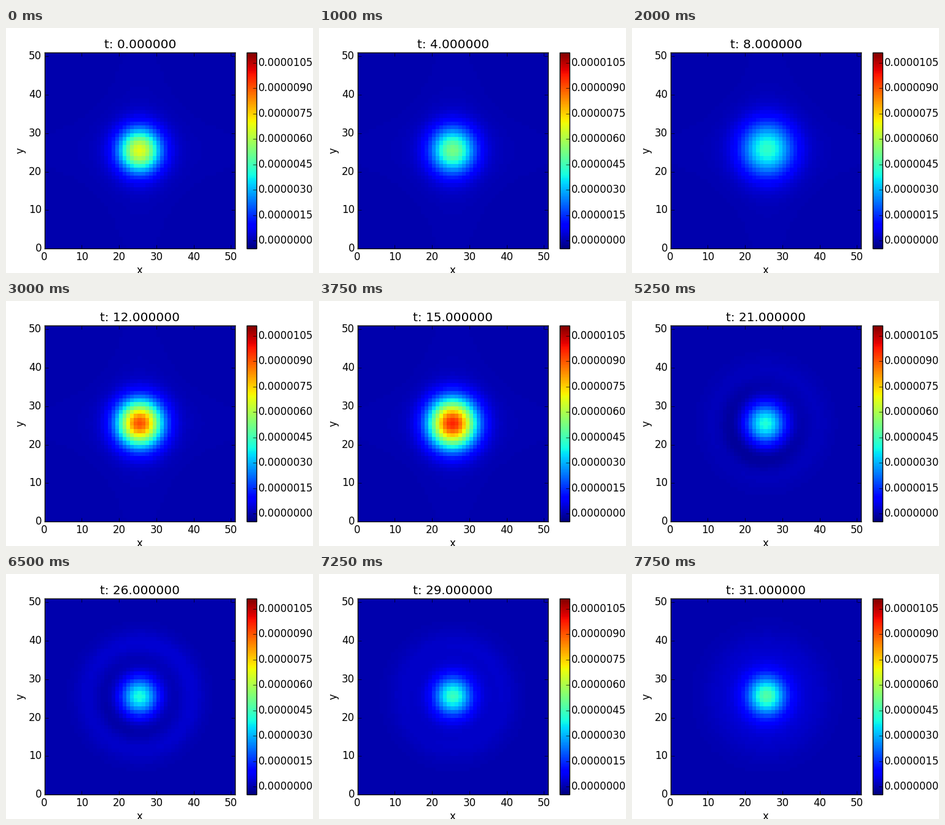
Write a matplotlib script that moves like this. It is 500x400 px and loops after 8 s.

```python
import numpy as np
import matplotlib.pyplot as plt
from matplotlib.animation import FuncAnimation

plt.style.use("classic")
plt.rcParams.update({
    "font.family": "DejaVu Sans",
    "xtick.major.pad": 3.3,
    "ytick.major.pad": 3.3,
    "axes.labelpad": 3.4,
})

N = 51
W, H = 500, 400
FRAMES, STEP = 32, 250
VMIN, VMAX = -0.47, 11.11  # in units of 1e-6

centers = np.arange(N) + 0.5 - N / 2
X, Y = np.meshgrid(centers, centers)


def bell(d, width):
    return np.exp(-0.5 * (d / width) ** 2)


def rise(t, mid):
    """Smooth step from 0 to 1 around mid."""
    return 1 / (1 + np.exp(-2 * (t - mid)))


def field(t):
    """Breathing core with a faint cross, a dark moat, a ring and a late halo."""
    core = 3.8 + 2.6 * bell(t, 3) + 5.5 * np.exp(-((t - 14.4) / 4.2) ** 4)
    width = (3.9 + 0.9 * bell(t - 8, 2.2) + 0.75 * bell(t - 17, 2)
             - 0.6 * rise(t, 20))
    halo = 0.2 + 0.75 * rise(t, 29)
    dip = 0.33 * bell(t - 22.5, 3.2)
    dip_radius = 12 - 3.5 * rise(t, 19.5)
    ring = 0.3 * bell(t - 25.5, 3.3)
    shift = 0.45 * bell(t - 8, 2) + 0.25 * rise(t, 29)

    x, y = X - shift, Y - 0.8 * shift
    r = np.hypot(x, y)
    lean = (x + y) / (r + 3)
    cross = bell(x, 5) * bell(y, 20) + bell(y, 5) * bell(x, 20)
    return (core * bell(r, width)
            + halo * bell(r, 7.5)
            - dip * (1 - 0.4 * lean) * bell(r - dip_radius, 2.2)
            + ring * (1 + 0.15 * lean) * bell(r - 14, 2.4)
            + 0.08 * (1 - rise(t, 20)) * cross)


fig = plt.figure(figsize=(W / 100, H / 100), dpi=100, facecolor="white")
ax = fig.add_axes([0.125, 0.1, 0.62, 0.8])
bar_ax = fig.add_axes([391.875 / W, 0.1, 16 / W, 0.8])

edges = np.arange(N + 1)
mesh = ax.pcolormesh(edges, edges, field(0), cmap="jet", vmin=VMIN, vmax=VMAX)
ax.set(xlim=(0, N), ylim=(0, N), xlabel="x", ylabel="y",
       xticks=range(0, N, 10), yticks=range(0, N, 10))
title = ax.set_title("t: 0.000000", x=0.503)

ticks = np.arange(8) * 1.5
bar = fig.colorbar(mesh, cax=bar_ax, ticks=ticks)
bar.ax.set_yticklabels([f"{v * 1e-6:.7f}" for v in ticks])
bar.ax.tick_params(axis="y", pad=2.5)


def draw(t):
    mesh.set_array(field(t))
    title.set_text(f"t: {t:.6f}")
    return mesh, title


anim = FuncAnimation(fig, draw, frames=FRAMES, interval=STEP, repeat=True,
                     repeat_delay=0, blit=False)
plt.show()
```
